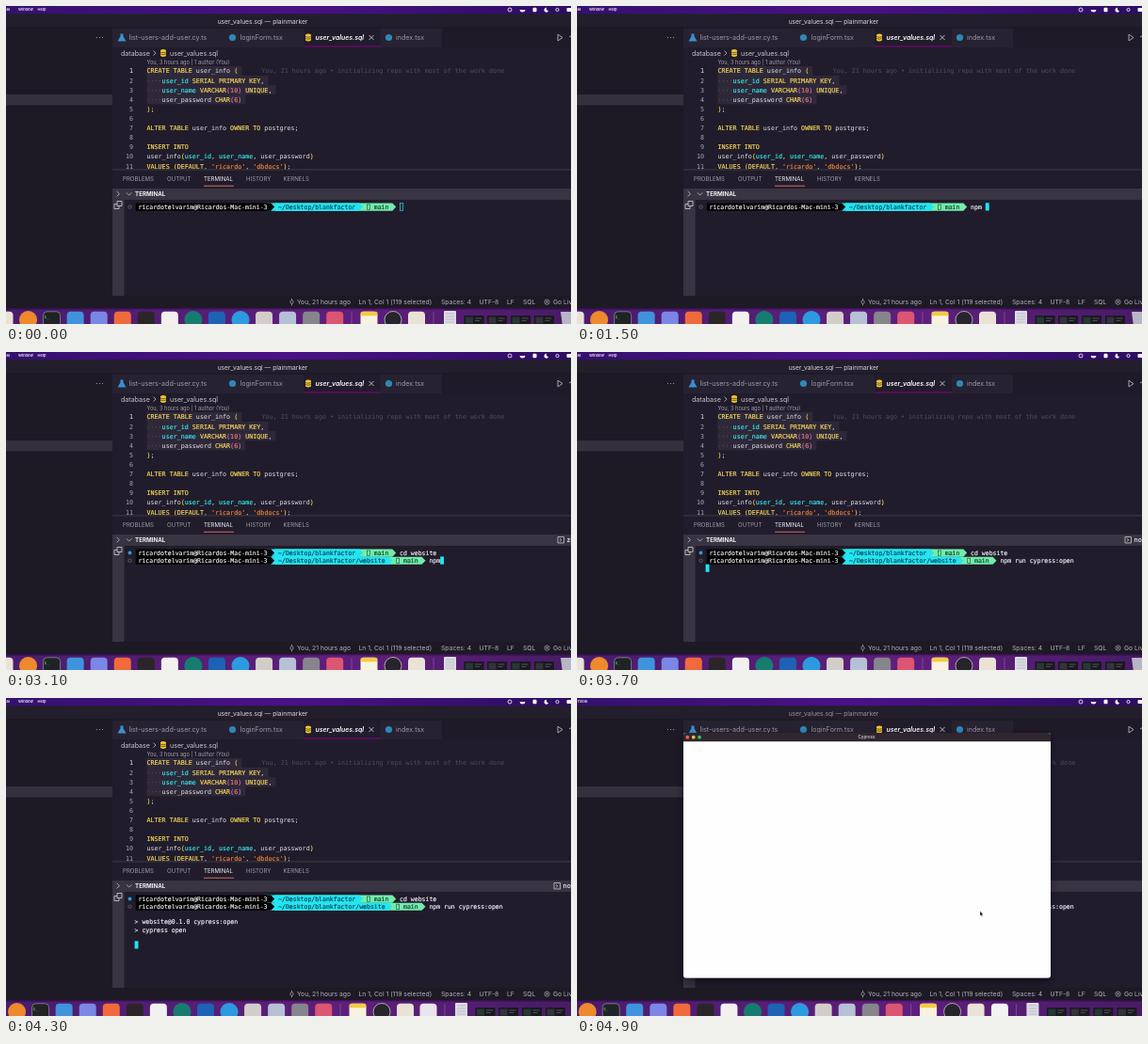
An HTML page that plays this animation: 600 px wide and 338 px high, repeating every 5 s.

```html
<!DOCTYPE html>
<html lang="en">
<head>
<meta charset="utf-8">
<title>Terminal session</title>
<style>
  html, body { margin: 0; width: 100%; height: 100%; overflow: hidden; background: #211c2b; }
  svg { display: block; width: 600px; height: 338px; }
  text { white-space: pre; font-family: Inter, Roboto, sans-serif; }
  .mono { font-family: "DejaVu Sans Mono", "Liberation Mono", monospace; }
</style>
</head>
<body>
<svg id="stage" viewBox="0 0 600 338">
  <defs>
    <linearGradient id="menu">
      <stop offset="0" stop-color="#35106f"/><stop offset=".5" stop-color="#4b1187"/><stop offset="1" stop-color="#2c0d63"/>
    </linearGradient>
    <linearGradient id="desk">
      <stop offset="0" stop-color="#3d1164"/><stop offset=".6" stop-color="#5a1478"/><stop offset="1" stop-color="#3a1059"/>
    </linearGradient>
    <filter id="shadow" x="-10%" y="-10%" width="120%" height="125%">
      <feDropShadow dx="0" dy="4" stdDeviation="5" flood-opacity=".5"/>
    </filter>
  </defs>
  <g id="editor"></g>
  <g id="live"></g>
</svg>
<script>
const LOOP = 5000, STEP = 100;
const $ = id => document.getElementById(id);
const esc = s => s.replace(/&/g, '&amp;').replace(/</g, '&lt;').replace(/>/g, '&gt;');
const text = (x, y, s, size, fill = '#c9c5d0', attrs = '') =>
  `<text x="${x}" y="${y}" font-size="${size}" fill="${fill}" ${attrs}>${esc(s)}</text>`;
const mono = (x, y, s, size, fill, attrs = '') => text(x, y, s, size, fill, 'class="mono" ' + attrs);
const rect = (x, y, w, h, fill, attrs = '') =>
  `<rect x="${x}" y="${y}" width="${w}" height="${h}" fill="${fill}" ${attrs}/>`;
const circle = (x, y, r, fill, attrs = '') => `<circle cx="${x}" cy="${y}" r="${r}" fill="${fill}" ${attrs}/>`;
const path = (d, fill, attrs = '') => `<path d="${d}" fill="${fill}" ${attrs}/>`;
const line = (d, color = '#c9c5d0', w = .8) => path(d, 'none', `stroke="${color}" stroke-width="${w}"`);

const database = (x, y) => path(`M${x - 3} ${y - 3}q3-2 6 0v6q-3 2-6 0z`, '#f3c52f') +
  line(`M${x - 3} ${y - 1}q3 1.6 6 0m-6 2q3 1.6 6 0`, '#211c2b', .6);

// ---- editor ----
const CODE = [
  'CREATE TABLE user_info (',
  '    user_id SERIAL PRIMARY KEY,',
  '    user_name VARCHAR(10) UNIQUE,',
  '    user_password CHAR(6)',
  ');',
  '',
  'ALTER TABLE user_info OWNER TO postgres;',
  '',
  'INSERT INTO',
  'user_info(user_id, user_name, user_password)',
  "VALUES (DEFAULT, 'ricardo', 'dbdocs');"
];
const TOKEN = /'[^']*'|\b[A-Z]+\b|\d+|[()]|user_(?:id|name)/g;
const BRACKETS = ['#ffd93a', '#da70d6'];
let depth = 0;
function tokenColor(s) {
  if (s === '(') return BRACKETS[depth++];
  if (s === ')') return BRACKETS[--depth];
  return s[0] === "'" ? '#ff8b39' : /\d/.test(s) ? '#f97e72' : /[A-Z]/.test(s) ? '#fede5d' : '#36f0f0';
}
const highlight = s => esc(s).replace(TOKEN, m => {
  const c = tokenColor(m);
  return `<tspan fill="${c}" stroke="${c}" stroke-width=".12">${m}</tspan>`;
});

function code() {
  const size = 6.7, cell = 4.033, left = 149.5;
  return CODE.map((s, i) => {
    const y = 71.4 + i * 10.12;
    const no = mono(135, y, String(i + 1), size, i ? '#aaa6b1' : '#e8e5ec', 'text-anchor="end"');
    const mark = i < 4 ? rect(left, y - 7.5, (s.length + 1) * cell, 10.12, '#2e2839') : '';
    const dots = i > 0 && i < 4 ? mono(left, y, '····', size, '#5a5463') : '';
    return mark + no + dots + `<text class="mono" x="${left}" y="${y}" font-size="${size}" fill="#e6e3ea">${highlight(s)}</text>`;
  }).join('') + mono(271.5, 71.4, 'You, 21 hours ago • initializing repo with most of the work done', size, '#514c59');
}

function editor() {
  return rect(0, 0, 600, 338, '#211c2b') +
    rect(0, 8, 600, 14, '#231e2c') +
    rect(0, 22, 113, 286, '#1d1925') + rect(0, 94, 113, 11.5, '#35303e') +
    rect(113, 22, 487, 22, '#1e1a27') + rect(113, 24, 350, 20, '#272231') + rect(316, 24, 82, 20, '#211c2b') +
    rect(316, 42.5, 82, 1, '#880088') +
    [96.5, 99.5, 102.5].map(x => circle(x, 33.5, .6, '#a5a1ac')).join('') +
    path('M121.5 29.5h3v2.8l3 5.2h-9l3-5.2z', '#3b8fd0') +
    text(130.5, 36, 'list-users-add-user.cy.ts', 7.15, '#9d99a6') +
    circle(240.5, 33.5, 3.6, '#2f87b8') + text(248.5, 36, 'loginForm.tsx', 7.1, '#9d99a6') +
    database(321, 33.5) + text(328.5, 36, 'user_values.sql', 6.9, '#fff', 'font-style="italic" font-weight="600"') +
    line('M385.5 31l5 5m0-5l-5 5', '#dedbe3') +
    circle(406.5, 33.5, 3.6, '#2f87b8') + text(414, 36, 'index.tsx', 7.1, '#9d99a6') +
    line('M586 30.2l5 3.4l-5 3.4zM598 33l3-2') +
    text(122, 52.6, 'database', 7.1) + line('M156.5 47.6l2.5 2.5l-2.5 2.5') +
    database(167, 50) + text(174, 52.6, 'user_values.sql', 7.1) +
    text(149.5, 61.8, 'You, 3 hours ago | 1 author (You)', 5.7, '#a39eaa') +
    code() +
    rect(113, 173.6, 487, 134.4, '#211c2b') + rect(113, 173.6, 487, .7, '#4b4653') +
    [[124, 'PROBLEMS'], [171, 'OUTPUT'], [210, 'TERMINAL'], [255, 'HISTORY'], [294.5, 'KERNELS']].map(([x, s]) =>
      text(x, 186.4, s, 6.1, s === 'TERMINAL' ? '#f2eff5' : '#9e9aa6')).join('') +
    rect(210, 190.8, 32, .8, '#f97e72') +
    rect(113, 194, 487, 12, '#393441') + rect(113, 206, 12.5, 102, '#393441') +
    line('M117.7 197l2.7 2.7l-2.7 2.7M128 198.4l2.7 2.7l2.7-2.7') +
    text(137, 202.2, 'TERMINAL', 6.2, '#f2eff5', 'font-weight="700"') +
    line('M118 207.5h5v5h-5zM115 210.5h3m2 2v3h-5v-5', '#d5d1da') +
    rect(0, 308, 600, 14, '#1d1925') +
    circle(303.5, 314.6, 1.7, 'none', 'stroke="#b5b0bc" stroke-width=".7"') +
    line('M303.5 310.8v2.1m0 3.4v2.1', '#b5b0bc', .7) +
    [[309, 'You, 21 hours ago'], [374.5, 'Ln 1, Col 1 (119 selected)'], [462, 'Spaces: 4'], [502.5, 'UTF-8'],
     [532, 'LF'], [549, 'SQL'], [581, 'Go Live']].map(([x, s]) => text(x, 317.2, s, 6.8, '#b5b0bc')).join('') +
    circle(574.5, 314.6, 1, '#b5b0bc') + circle(574.5, 314.6, 2.6, 'none', 'stroke="#b5b0bc" stroke-width=".7"');
}

// ---- terminal ----
const CELL = 3.91, COL0 = 136.6, ROW = 8.17, CYAN = '#1fe6f5';
const col = n => COL0 + n * CELL;
const rowY = i => 209.5 + i * ROW;
const put = (n, i, s, fill = '#f5f3f7') => mono(col(n), rowY(i) + 6.4, s, 6.5, fill, `stroke-width=".15" stroke="${fill}"`);

function ribbon(a, b, i, fill) {
  const y = rowY(i), x = col(a), end = col(b);
  return path(`M${x} ${y}H${end}l${CELL} ${ROW / 2}l${-CELL} ${ROW / 2}H${x}z`, fill);
}
// Column where the typed command starts
const commandCol = dir => dir.length + 51;
function prompt(i, dir, cmd, done) {
  const c = commandCol(dir);
  const dot = done ? circle(131.5, rowY(i) + 4, 1.9, '#2d9be0')
                   : circle(131.5, rowY(i) + 4, 1.7, 'none', 'stroke="#77727f" stroke-width=".7"');
  return dot + ribbon(38, c - 2, i, '#72ebab') + ribbon(36, c - 11, i, CYAN) + ribbon(.3, 37, i, '#000') +
    put(1, i, 'ricardotelvarim@Ricardos-Mac-mini-3') + put(39, i, dir, '#103c50') +
    rect(col(c - 9) + .5, rowY(i) + 1.5, 3, 5.2, 'none', 'stroke="#174a35" stroke-width=".6"') +
    put(c - 7, i, 'main', '#103b2a') + put(c, i, cmd);
}
const cursor = (n, i, solid = true) => solid
  ? rect(col(n), rowY(i) - .2, CELL, ROW, CYAN)
  : rect(col(n) + .3, rowY(i) + .2, CELL - .6, ROW - .6, 'none', `stroke="${CYAN}" stroke-width=".7"`);

const HOME = '~/Desktop/blankfactor', SITE = HOME + '/website';
const FIRST = [[0, ''], [900, 'n'], [1000, 'np'], [1100, 'npm'], [1200, 'npm '], [1700, 'npm'], [1800, 'n'], [1900, ''],
  [2000, 'c'], [2100, 'cd '], [2200, 'cd w'], [2300, 'cd web'], [2400, 'cd webs'], [2500, 'cd websit'], [2600, 'cd website']];
const SECOND = 'npm run cypress:open';
const typed = t => FIRST.filter(k => k[0] <= t).pop()[1];
const secondLength = t => t <= 3100 ? Math.max(0, (t - 2800) / 100)
  : Math.min(SECOND.length, Math.round(3 + (t - 3100) * .034));

function terminal(t, open) {
  const first = typed(t), moved = t >= 2800, run = t >= 3700, out = t >= 3900;
  let s = prompt(0, HOME, first, moved);
  if (!moved) return s + cursor(commandCol(HOME) + first.length, 0, t >= 600);
  const n = secondLength(t);
  s += prompt(1, SITE, SECOND.slice(0, n));
  if (out) s += put(0, 3, '> website@0.1.0 cypress:open') + put(0, 4, '> cypress open');
  s += out ? cursor(0, 6) : run ? cursor(0, 2) : cursor(commandCol(SITE) + n, 1);
  if (open) return s;
  const x = run ? 582 : 586;
  return s + line(`M${x} 196.5h6.5v6.5h-6.5zM${x + 2} 198.2l1.8 1.6l-1.8 1.6`) +
    text(x + 9.5, 202.2, run ? 'node' : 'zsh', 6.8, '#e2dfe6', 'font-weight="600"');
}

// ---- dock ----
const APPS = ['#e9e2d5', '#ee8a2c', '#202326', '#3f93dc', '#7b86e6', '#f06a3c', '#2b2529', '#f2f1f0',
  '#177c70', '#1d62b4', '#2b9ade', '#d3cdca', '#b6c1d5', '#85858b', '#dc5571'];
const ROUND = [1, 8, 10];
const tile = (x, fill, attrs = '') => rect(x - 9, 324.8, 18, 18, fill, 'rx="4" ' + attrs);

function dock(t) {
  const p = Math.min(1, Math.max(0, (t - 3900) / 450)), k = p * p * (3 - 2 * p), s = 12.4 * k;
  let d = rect(0, 321.5, 600, 17, 'url(#desk)') + rect(0, 323, 600, 16, '#6b3a86', 'opacity=".28"');
  APPS.forEach((c, i) => {
    const x = -1.5 + i * 25.05 - s;
    d += ROUND.includes(i) ? circle(x, 333.5, 9.5, c) : tile(x, c, i === 2 ? 'stroke="#8c8c92" stroke-width=".8"' : '');
  });
  d += line(`M${367 - s} 325v13M${454 + s} 325v13`, '#8f6aa5', .6);
  d += text(40.5 - s, 332, '$_', 4.5, '#58d26b', 'class="mono"') + tile(385.5 - s, '#f7f3df') +
    rect(376.5 - s, 324.8, 18, 4.5, '#f4cb45', 'rx="2"') +
    circle(411 - s, 333.5, 9, '#25252b', 'stroke="#c9c9ce" stroke-width=".8"') + tile(436 - s, '#e9e2d5');
  if (k > 0) d += `<g opacity="${k * k}">` + tile(436.5 + s, '#f3f3f4') + '</g>';
  d += rect(465 + s, 324, 13, 16, '#dcdce3', 'rx="1"') +
    [0, 1, 2, 3].map(i => line(`M${467 + s} ${327 + i * 3}h9`, '#a4a4b1', .6)).join('');
  [497, 521.5, 546.5, 571.5].forEach((x, i) => {
    d += rect(x - 10.5 + s, 329, 21, 12, '#19191f') + rect(x - 9 + s, 330.5, 8, 7, i % 2 ? '#34323c' : '#253833') +
      line(`M${x + 1 + s} 332h7m-7 2.5h5`, '#777482', .6);
  });
  return d + path(`M${589 + s} 325h17l-2 15h-13z`, '#b8b5c4');
}

// ---- menu bar, title and app window ----
function menuBar(open) {
  const items = open ? [[-2, 'r Tools']] : [[-2, 'nal'], [13, 'Window'], [33.5, 'Help']];
  return rect(0, 0, 600, 8.2, 'url(#menu)') +
    items.map(([x, s]) => text(x, 5.4, s, 4, '#f2eef7', 'font-weight="600"')).join('') +
    circle(535, 4, 2, 'none', 'stroke="#fff" stroke-width=".8"') + path('M545.5 4h6q-.5 2.5-3 2.5t-3-2.5z', '#fff') +
    rect(559.5, 1.8, 4, 4.5, '#fff', 'rx="1"') + path('M574 1.8a2.4 2.4 0 1 0 2 3.5a2.6 2.6 0 0 1-2-3.5z', '#fff') +
    circle(585.5, 4, 1.6, 'none', 'stroke="#fff" stroke-width=".8"') + rect(595.5, 2, 5, 4, '#fff', 'rx="1"') +
    text(272.5, 18.6, 'user_values.sql — plainmarker', 6.7, open ? '#96929e' : '#d8d5de', 'text-anchor="middle"');
}
function appWindow() {
  return rect(113, 37, 390, 260.5, '#fefefe', 'rx="3" filter="url(#shadow)"') +
    path('M113 46.3V40q0-3 3-3H500q3 0 3 3V46.3z', '#30262f') +
    circle(117.3, 41.7, 1.9, '#fb5d55') + circle(123.7, 41.7, 1.9, '#f8bc38') + circle(130, 41.7, 1.9, '#37c649') +
    text(307.5, 43.3, 'Cypress', 4.5, '#c6c0c6', 'text-anchor="middle" font-weight="600"') +
    path('M428 226.5v5l1.1-1l.8 1.7l.8-.4l-.8-1.6h1.5z', '#111', 'stroke="#fff" stroke-width=".25"');
}

$('editor').innerHTML = editor();
let shown = -1;
function frame(now) {
  const t = Math.floor(now % LOOP / STEP) * STEP;
  if (t !== shown) {
    shown = t;
    const open = t >= 4900;
    $('live').innerHTML = terminal(t, open) + (open ? appWindow() : '') + dock(t) + menuBar(open);
  }
  requestAnimationFrame(frame);
}
frame(performance.now());
</script>
</body>
</html>
```
